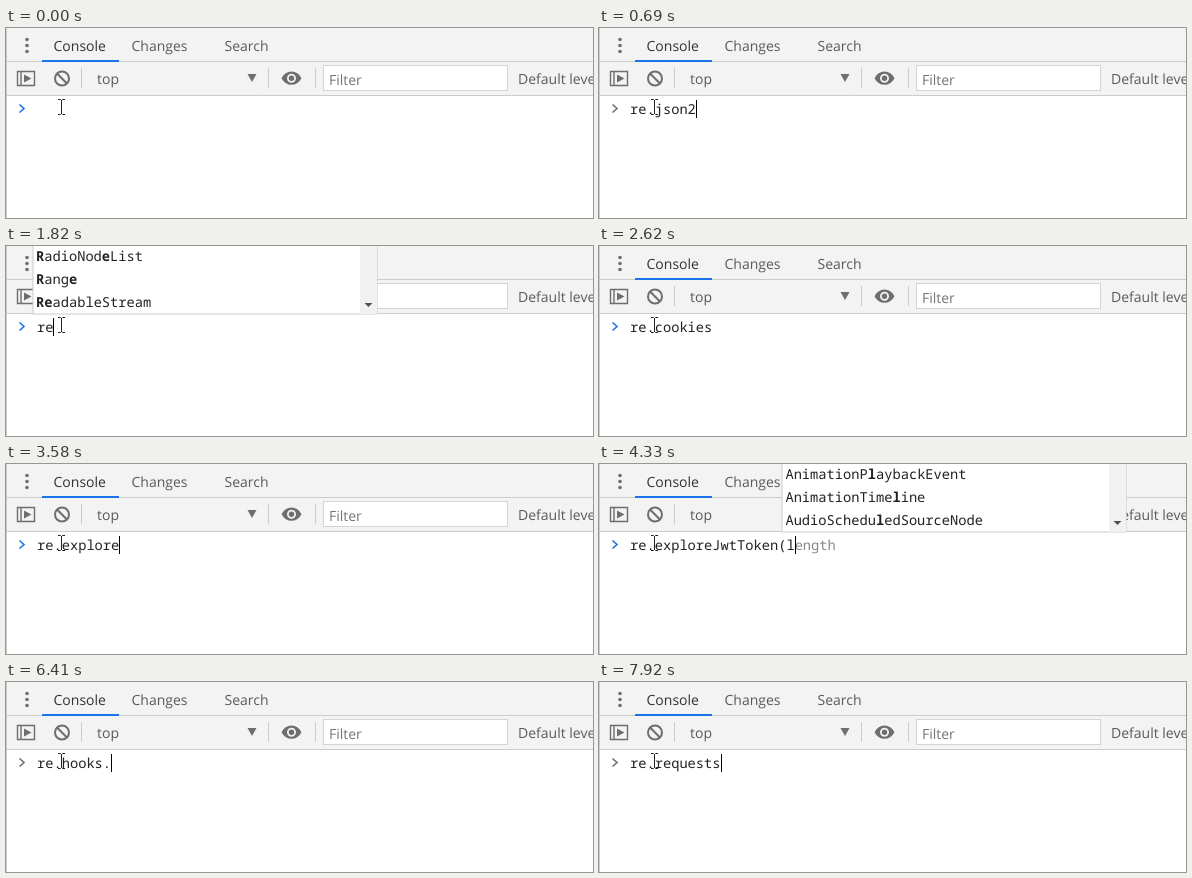
Write an HTML page that moves like this. It is 587x190 px and loops after 8000 ms.

```html
<!DOCTYPE html>
<html lang="en">
<head>
<meta charset="utf-8">
<title>Console typing</title>
<style>
  html, body { margin: 0; width: 100%; height: 100%; overflow: hidden; background: #fff; }
  svg { display: block; }
  text { font: 14px "Open Sans", "Noto Sans", sans-serif; fill: #5a5a5a; text-rendering: geometricPrecision; }
  .code text { font: 13.72px "Noto Sans Mono", "DejaVu Sans Mono", monospace; fill: #222; }
  .code .ghost { fill: #888; }
  .code .picked { fill: #fff; }
  .bold { font-weight: 700; }
</style>
</head>
<body>
<svg width="587" height="190" viewBox="0 0 587 190">
  <rect width="587" height="67" fill="#f3f3f3"/>
  <path d="M0 33.5H587M0 67.5H587" stroke="#ccc"/>
  <rect x="36" y="32" width="77" height="2" fill="#1a73e8"/>
  <g fill="#6e6e6e">
    <circle cx="21" cy="11.5" r="1.8"/><circle cx="21" cy="17.5" r="1.8"/><circle cx="21" cy="23.5" r="1.8"/>
    <path d="M18 46.5L25.5 50.5L18 54.5Z"/>
    <path d="M241.5 46H250.5L246 54Z"/>
    <path fill-rule="evenodd" d="M275.5 50.2Q279 43.6 285.5 43.6T295.500 50.2Q292 56.800 285.500 56.800T275.500 50.200ZM281 50.200a4.500 4.500 0 1 0 9 0a4.500 4.500 0 1 0-9 0Z"/>
    <circle cx="285.5" cy="50.2" r="2.7"/>
  </g>
  <g fill="none" stroke="#6e6e6e">
    <path d="M11.5 43.5H28.5V57.500H11.500ZM15 43.500V57.500" stroke-width="1.4"/>
    <path d="M50.800 45.300L61.200 55.700" stroke-width="2"/>
    <circle cx="56" cy="50.500" r="7" stroke-width="2"/>
  </g>
  <path d="M75.500 40V60M262.500 40V60M309.500 40V60" stroke="#ccc"/>
  <rect x="317.500" y="37.500" width="184" height="25" fill="#fff" stroke="#d4d4d4"/>
  <text x="47.500" y="23" style="fill:#333">Console</text>
  <text x="125.500" y="23">Changes</text>
  <text x="218.500" y="23">Search</text>
  <text x="91" y="56">top</text>
  <text x="323" y="57" style="fill:#757575">Filter</text>
  <text x="512" y="56">Default levels</text>
  <path d="M.5 0V190" stroke="#ccc"/>
  <path id="chevron" d="M13.500 76.500L18 80.500L13.500 84.500" fill="none" stroke-width="1.6"/>
  <g id="prompt" class="code"></g>
  <path d="M52 71.500H54.500L55.500 72.500L56.500 71.500H59M55.500 72V86M52 86.500H54.500L55.500 85.500L56.500 86.500H59" fill="none" stroke="#222"/>
  <g id="popup" class="code"></g>
</svg>
<script>
const LOOP = 8000, LEFT = 31, CHAR = 8.232, ROW = 23, BOTTOM = 68, SETTLE = 30;
const LAST_LINE = 7240;

// Typing runs: start time, ms per key, characters
const runs = [
  [100, 83, 're.json2ts'], [910, 110, '(js'], [1250, 90, 'on)'],
  [1640, 0, 'r'], [1770, 94, 'e.cookies'],
  [2760, 80, 're.explo'], [3450, 71, 'reJwtToken(l'], [4430, 47, 'ocalStorage.TO'],
  [5140, 130, 'KE'], [5350, 80, 'N)'],
  [5680, 77, 're.h'], [5990, 105, 'ooks.'], [6510, 42, 'enable('], [6860, 0, ')'],
  [7300, 62, 're.requests']
];
// Each line ends with the caret going out, then an empty prompt
const endings = [[1500, 1570], [2620, 2690], [5520, 5600], [7070, LAST_LINE]];

const rNames = ['RadioNodeList', 'Range', 'ReadableStream'];
const lNames = ['AnimationPlaybackEvent', 'AnimationTimeline', 'AudioScheduledSourceNode'];
const popups = [
  { from: 130, to: 266, column: 0, items: rNames, long: true },
  { from: 1130, to: 1430, column: 11, items: ['JSON'] },
  { from: 1670, to: 1864, column: 0, items: rNames, long: true },
  { from: 4330, to: 4430, column: 19, items: lNames, long: true, ghost: 'length' },
  { from: 4430, to: 4571, column: 19, items: ['localStorage', 'location', 'locationbar'], ghost: 'localStorage' },
  { from: 4571, to: 4947, column: 19, items: ['localStorage'], ghost: 'localStorage' }
];

const keys = runs.flatMap(([start, step, chars]) =>
  [...chars].map((char, i) => ({ time: start + i * step, char })));
const find = id => document.getElementById(id);
const columnX = column => LEFT + column * CHAR;

function stateAt(time) {
  const cleared = Math.max(0, ...endings.map(e => e[1]).filter(t => t <= time));
  const typed = keys.filter(k => k.time >= cleared && k.time <= time);
  const text = typed.map(k => k.char).join('');
  const idle = endings.some(([off, clear]) => time >= off && time < clear);
  const age = typed.length ? time - typed[typed.length - 1].time : Infinity;
  const pending = text && !idle && (age < SETTLE || text.endsWith('.') || time >= LAST_LINE);
  const popup = popups.find(p => time >= p.from && time < p.to);
  return { text, pending, popup, caret: text && !idle };
}

function markMatch(name, query) {
  let next = 0;
  return [...name].map(char => {
    const hit = next < query.length && char.toLowerCase() === query[next].toLowerCase();
    if (hit) next++;
    return hit ? `<tspan class="bold">${char}</tspan>` : char;
  }).join('');
}

function promptMarkup({ text, caret, popup }) {
  const end = columnX(text.length);
  const rest = popup && popup.ghost ? popup.ghost.slice(text.length - popup.column) : '';
  return `<text x="${LEFT}" y="86">${text}</text>` +
    (rest ? `<text class="ghost" x="${end}" y="86">${rest}</text>` : '') +
    (caret ? `<rect x="${Math.round(end)}" y="72" width="1" height="18"/>` : '');
}

function popupMarkup({ text, popup }) {
  if (!popup) return '';
  const { items, long, column } = popup;
  const x = Math.round(columnX(column)) - 4;
  const longest = Math.max(...items.map(name => name.length));
  const width = long ? 344 : Math.round(longest * CHAR + 46);
  const top = long ? -10 : BOTTOM - ROW * items.length;
  const box = `<rect x="${x}" y="${top}" width="${width}" height="${BOTTOM - top}" `;
  const frame = box + 'fill="#fff" stroke="#ccc"/>';
  const rows = items.map((name, i) => {
    const rowTop = BOTTOM - ROW * (items.length - i);
    const picked = !long && i === 0;
    return (picked ? `<rect x="${x}" y="${rowTop}" width="${width}" height="${ROW}" fill="#2a73e8"/>` : '') +
      `<text x="${columnX(column) - 1}" y="${rowTop + 16}" class="${picked ? 'picked' : ''}">` +
      markMatch(name, text.slice(column)) + '</text>';
  }).join('');
  const bar = x + width - 17;
  const scroll = long
    ? `<rect x="${bar}" y="0" width="17" height="${BOTTOM}" fill="#f1f1f1"/>` +
      `<path d="M${bar + 4.5} 57h8l-4 4z" fill="#505050"/>`
    : '';
  return frame + rows + scroll;
}

let shown = '';
function draw(time) {
  const state = stateAt(time);
  const prompt = promptMarkup(state), popup = popupMarkup(state);
  const stroke = state.pending ? '#6e6e6e' : '#1a73e8';
  if (shown === prompt + popup + stroke) return;
  shown = prompt + popup + stroke;
  find('prompt').innerHTML = prompt;
  find('popup').innerHTML = popup;
  find('chevron').setAttribute('stroke', stroke);
}

const begin = performance.now();
function tick() {
  draw((performance.now() - begin) % LOOP);
  requestAnimationFrame(tick);
}
tick();
</script>
</body>
</html>
```
